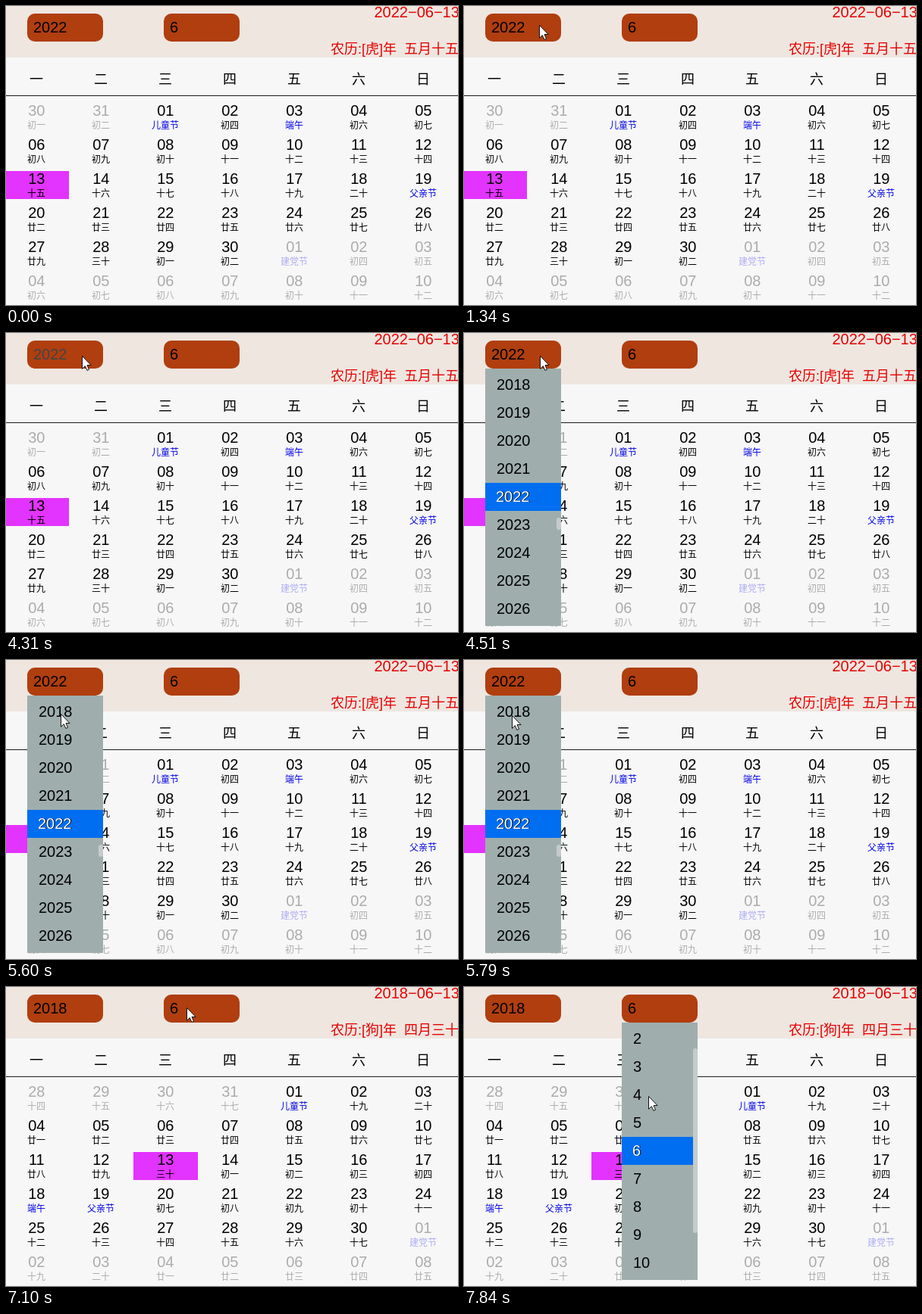
Recreate the animation shown at these times as an HTML page. Size 596 by 395 pixels, loop 8 s.

```html
<!DOCTYPE html>
<html lang="zh-CN">
<head>
<meta charset="utf-8">
<style>
html, body { margin: 0; width: 596px; height: 395px; overflow: hidden; background: #f7f7f7; }
svg { display: block; font-family: "Liberation Sans", "Noto Sans CJK SC", "Noto Sans CJK", sans-serif; font-size: 20px; }
text { white-space: pre; }
.mid { text-anchor: middle; }
.cn { font-size: 18px; }
.lunar { font-size: 12px; }
.red { fill: #e60000; }
.feast { fill: #0000e6; }
.other { opacity: .3; }
</style>
</head>
<body>
<svg id="stage" width="596" height="395" viewBox="0 0 596 395"></svg>
<script>
const LOOP = 8000, STEP = 184;
const PRESS = 4130, OPEN_YEARS = 4500, PICK_YEAR = 5980, OPEN_MONTHS = 7290;
const DIGITS = '一二三四五六七八九';
const stage = document.getElementById('stage');

function add(parent, tag, attrs = {}, content = '') {
  const el = document.createElementNS('http://www.w3.org/2000/svg', tag);
  for (const key in attrs) el.setAttribute(key, attrs[key]);
  el.textContent = content;
  parent.append(el);
  return el;
}
const rect = (p, x, y, width, height, fill, rx = 0) => add(p, 'rect', { x, y, width, height, fill, rx });
const label = (p, x, y, content, cls = '') => add(p, 'text', { x, y, class: cls }, content);
const pad = n => String(n).padStart(2, '0');
const show = (el, on) => { el.style.display = on ? '' : 'none'; };

function lunarName(d) {
  if (d % 10 === 0) return ['初十', '二十', '三十'][d / 10 - 1];
  return '初十廿'[Math.floor(d / 10)] + DIGITS[d % 10 - 1];
}

// A June page: number of leading May days, lunar day of the first cell, dragon boat cell
function buildMonth({ year, lead, lunar, dragon, title }) {
  const g = add(stage, 'g');
  const feasts = { [lead]: '儿童节', [lead + 18]: '父亲节', [lead + 30]: '建党节', [dragon]: '端午' };
  label(g, 485.5, 15, `${year}\u221206\u221213`, 'red');
  label(g, 428, 63, title, 'cn red');
  for (let i = 0; i < 42; i++) {
    const x = 40 + i % 7 * 85;
    const y = 128 + Math.floor(i / 7) * 45;
    const june = i - lead + 1;
    const inside = june > 0 && june < 31;
    const day = june < 1 ? june + 31 : inside ? june : june - 30;
    if (june === 13) rect(g, x - 42, y, 85, 37, '#e333ff');
    const cell = add(g, 'g', { class: inside ? 'mid' : 'mid other' });
    label(cell, x + .3, y + 17, pad(day));
    label(cell, x, y + 33.5, feasts[i] || lunarName((lunar + i - 1) % 30 + 1), feasts[i] ? 'lunar feast' : 'lunar');
  }
  return g;
}

function buildList(x, first, selWidth, barY, barHeight) {
  const g = add(stage, 'g');
  rect(g, x, 47, 100, 340, '#9faead');
  for (let i = 0; i < 9; i++) {
    const y = 50 + i * 37;
    if (i === 4) rect(g, x, y, selWidth, 37, '#006ef0');
    label(g, x + 15, y + 25, first + i);
    if (i === 4) label(g, x + 14, y + 25, first + i).setAttribute('fill', '#fff');
  }
  rect(g, x + 94, barY, 6, barHeight, '#c4cccb', 3);
  return g;
}

rect(stage, 0, 0, 596, 395, '#f7f7f7');
rect(stage, 0, 0, 596, 68, '#efe6e0');
rect(stage, 0, 118, 596, 1, '#1a1a1a');
[...'一二三四五六日'].forEach((c, i) => label(stage, 40 + i * 85, 103, c, 'cn mid'));

const before = buildMonth({ year: 2022, lead: 2, lunar: 1, dragon: 4, title: '农历:[虎]年  五月十五' });
const after = buildMonth({ year: 2018, lead: 4, lunar: 14, dragon: 21, title: '农历:[狗]年  四月三十' });

for (const x of [28, 208]) rect(stage, x, 10, 100, 37, '#b03e0f', 10);
const yearText = label(stage, 36, 35, '2022');
label(stage, 216, 35, '6');

const years = buildList(28, 2018, 100, 244, 16);
const months = buildList(208, 2, 94, 81, 244);

const cursor = add(stage, 'path', {
  d: 'M.5 .5V17.3L4.3 13.6L6.9 19.4L9.5 18.3L7 12.5H12Z',
  fill: '#fff', stroke: '#111'
});

// Cursor strokes: start time, number of even jumps, end point
const MOVES = [
  [590, 1, 325, 211], [960, 3, 99, 25], [1910, 2, 276, 26], [2270, 2, 261, 25],
  [3010, 1, 180, 48], [3200, 2, 77, 23], [3950, 1, 100, 30], [4680, 6, 72, 71],
  [5790, 2, 54, 75], [6150, 2, 35, 161], [6530, 3, 247, 38], [7100, 1, 238, 27],
  [7640, 2, 243, 144]
];

function cursorAt(t) {
  let x = 0, y = 0;
  for (const [start, jumps, toX, toY] of MOVES) {
    if (t < start) break;
    const done = Math.min(1, (Math.floor((t - start) / STEP) + 1) / jumps);
    x += (toX - x) * done;
    y += (toY - y) * done;
  }
  return [Math.round(x), Math.round(y)];
}

function draw(t) {
  const picked = t >= PICK_YEAR;
  show(before, !picked);
  show(after, picked);
  show(years, t >= OPEN_YEARS && !picked);
  show(months, t >= OPEN_MONTHS);
  yearText.textContent = picked ? '2018' : '2022';
  yearText.setAttribute('fill', t >= PRESS && t < OPEN_YEARS ? '#444' : '#000');
  show(cursor, t >= MOVES[0][0]);
  cursor.setAttribute('transform', `translate(${cursorAt(t)})`);
}

const start = performance.now();
function tick() {
  draw((performance.now() - start) % LOOP);
  requestAnimationFrame(tick);
}
tick();
</script>
</body>
</html>
```
